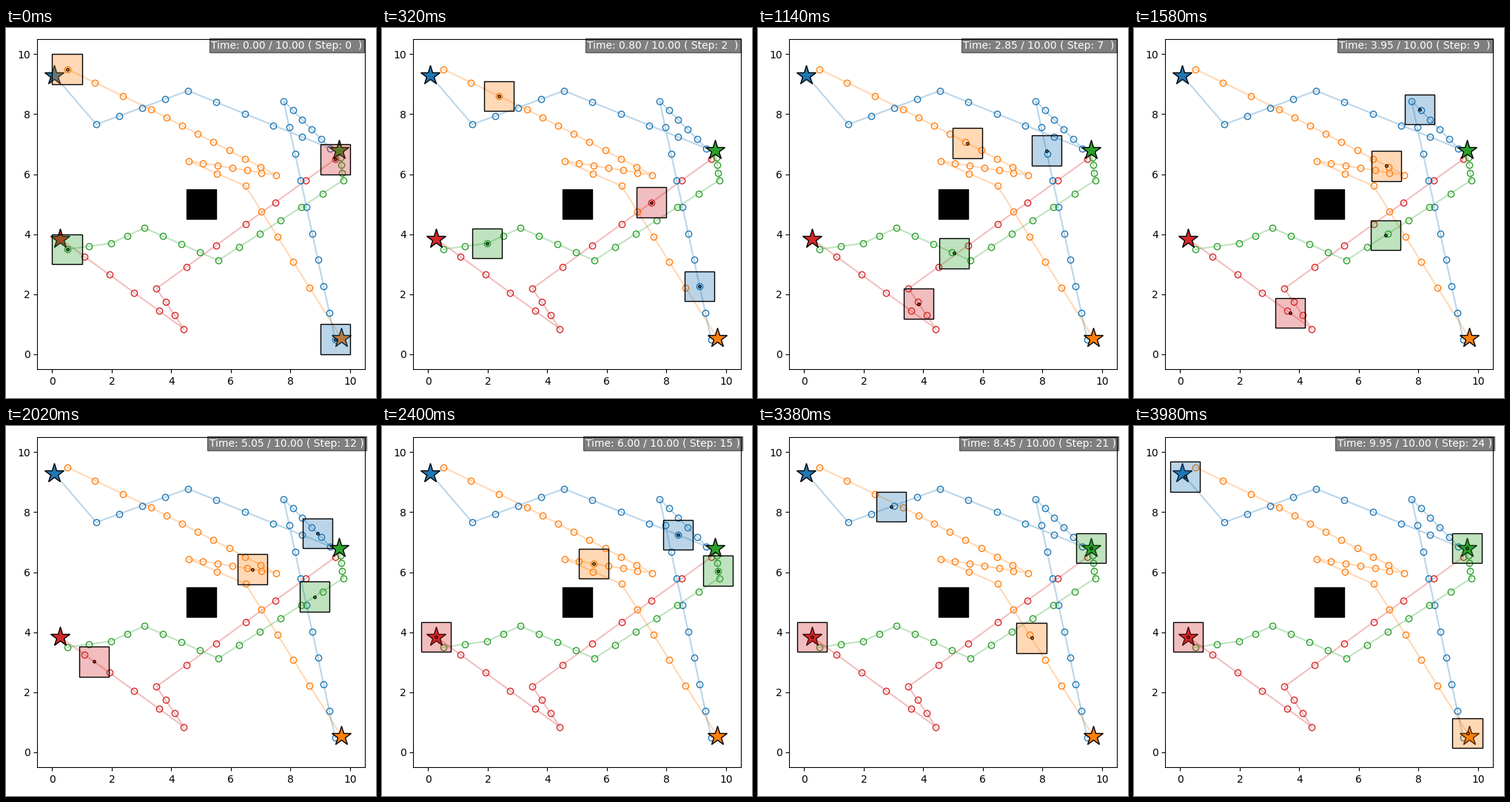
Recreate the animation shown at these times as a matplotlib script. Size 500 by 500 pixels, loop 4000 ms.

```python
import numpy as np
import matplotlib.pyplot as plt
from matplotlib.animation import FuncAnimation
from matplotlib.colors import to_rgba
from matplotlib.patches import Rectangle

FRAMES, INTERVAL = 200, 20
END_TIME, STEPS = 10.0, 25
FRAMES_PER_STEP = FRAMES // STEPS
FADE = 0.3

plt.rcParams["font.family"] = "DejaVu Sans"

# Corners where a robot changes heading: (step, x, y).
# It runs evenly along each leg and rests at the last corner.
ROUTES = {
    "red": [(0, 9.5, 6.5), (6, 3.5, 2.19), (9, 4.42, 0.85), (14, 0.26, 3.85)],
    "orange": [(0, 0.5, 9.5), (3, 3.31, 8.16), (11, 7.52, 5.97),
               (17, 4.58, 6.44), (19, 6.49, 5.61), (25, 9.71, 0.54)],
    "blue": [(0, 9.5, 0.5), (9, 7.77, 8.44), (14, 9.34, 6.86),
             (19, 4.56, 8.78), (23, 1.48, 7.66), (25, 0.07, 9.29)],
    "green": [(0, 0.5, 3.5), (2, 1.98, 3.7), (4, 3.09, 4.21), (8, 5.58, 3.13),
              (14, 9.77, 5.8), (18, 9.635, 6.8)],
}


def square(x, y, **style):
    return ax.add_patch(Rectangle((x - 0.5, y - 0.5), 1, 1, **style))


class Robot:
    def __init__(self, name, corners):
        color = f"tab:{name}"
        self.steps, *self.axes = np.transpose(corners)
        path = self.at(np.arange(STEPS + 1))
        ax.plot(*path, color=color, alpha=FADE, zorder=2)
        ax.plot(*path[:, :-2], "o", mfc="none", mec=color, zorder=2.1)
        ax.plot(*path[:, -1], "*", ms=20, mfc=color, mec="black", zorder=3)
        self.box = square(0, 0, fc=to_rgba(color, FADE), ec="black", zorder=4)
        self.dot, = ax.plot([], [], "o", ms=2.6, mfc=color, mec="black",
                            mew=0.8, zorder=4.1)

    def at(self, step):
        return np.array([np.interp(step, self.steps, a) for a in self.axes])

    def move(self, step):
        pos = self.at(step)
        self.box.set_xy(pos - 0.5)
        self.dot.set_data(*pos[:, None])


fig, ax = plt.subplots(figsize=(5, 5), dpi=100)
ax.set(xlim=(-0.5, 10.5), ylim=(-0.5, 10.5))
fig.tight_layout()

square(5, 5, color="black")
robots = [Robot(name, corners) for name, corners in ROUTES.items()]
clock = ax.text(7.88, 10.29, "", color="white", ha="center", va="center",
                zorder=5, bbox=dict(fc="black", alpha=0.5, pad=2))


def update(i):
    step = i / FRAMES_PER_STEP
    for robot in robots:
        robot.move(step)
    clock.set_text(f"Time: {i * END_TIME / FRAMES:.2f} / {END_TIME:.2f} "
                   f"( Step: {int(step):<3d})")


anim = FuncAnimation(fig, update, frames=FRAMES, interval=INTERVAL,
                     repeat=True, repeat_delay=0)
plt.show()
```
